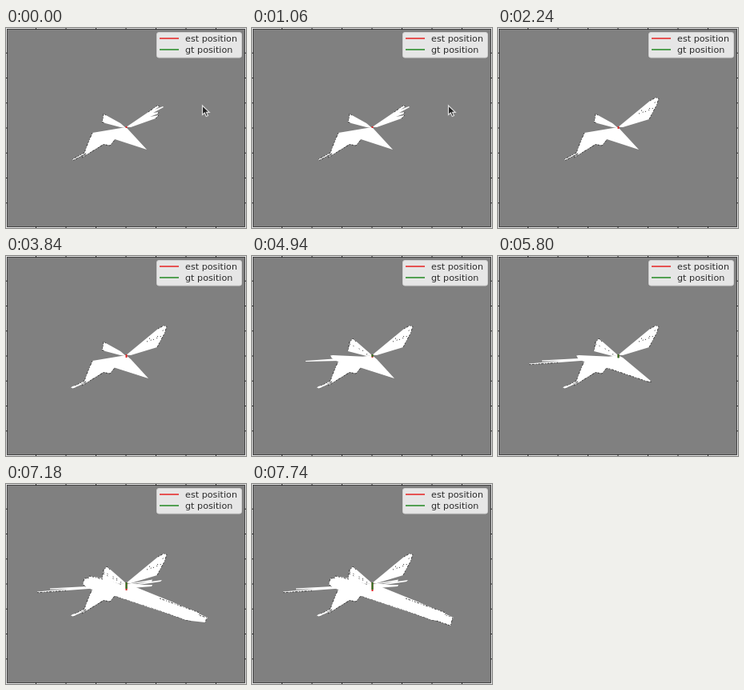
Write an HTML page that moves like this. It is 300 px wide and 250 px high and loops after 8000 ms.

```html
<!DOCTYPE html>
<html lang="en">
<head>
<meta charset="utf-8">
<title>Occupancy map</title>
<style>
  html, body { margin: 0; width: 100%; height: 100%; overflow: hidden; background: #808080; }
  svg { display: block; width: 300px; height: 250px; }
  .free { fill: #fff; }
  .wall { fill: none; stroke: #222; stroke-width: .8; stroke-dasharray: 2 1.5 3 2 1 2; }
  .spots { fill: none; stroke: #222; stroke-width: 1; stroke-dasharray: 1 4 1 7; }
  .gap { fill: #808080; }
  .trail { fill: none; stroke-width: 2; }
  text { font: 11.2px "DejaVu Sans", sans-serif; fill: #2a2a2a; }
</style>
</head>
<body>
<svg viewBox="0 0 300 250">
  <rect width="300" height="250" fill="#808080"/>
  <rect x=".5" y=".5" width="299" height="249" fill="none" stroke="#e4e4e4"/>
  <rect x="1.500" y="1.500" width="297" height="247" fill="none" stroke="#333" stroke-width=".8"/>
  <path id="ticks" fill="none" stroke="#222"/>

  <!-- lower left -->
  <path class="free" d="M150 124L108 131L102 145L98 156L83 164L84 165.500L101 156L95 162L122 145L130 147L136 139L176 152L152 126Z"/>
  <path class="wall" d="M108 131L102 145L98 156L83 164M84 165.500L100 157M95 162L122 145.500L130 147L136 140"/>
  <path class="free" data-from="2440" d="M83 163L81 164.500L84 165.500L100 158Z"/>

  <!-- upper left -->
  <path class="free" d="M150 125L143 119L125 109L122 107L121 115L119 117L124 119L143 124Z"/>
  <path class="wall" d="M125 109L122 107L121 115L119 117L124 119"/>
  <path class="free" data-from="4660" d="M150 124L126 103L122 108L120 119L143 125Z"/>
  <path class="wall" data-from="4660" d="M130 107L126 103L122 108L120 118"/>
  <path class="spots" data-from="4660" d="M122 110L144 121L143 125"/>
  <path class="free" data-from="4940" d="M145 126L101 124L98 124.500L100 128L109 133L130 133Z"/>
  <path class="free" data-from="4940" data-to="5520" d="M109 128L67 131V132L109 131Z"/>
  <path class="free" data-from="5520" d="M110 127.500L55 130.500V131.700L80 131L39 134.500V135.700L110 130.500Z"/>
  <path class="wall" data-from="5520" d="M39 135.700L75 133.300"/>
  <path class="free" data-from="6060" d="M145 126L122 118L104 115L103 118L98 118L96 125L100 129L112 131Z"/>
  <path class="wall" data-from="6060" d="M121 119L104 115L103 118L98 118L96 125L100 129"/>
  <path class="spots" data-from="6060" d="M122 112L131 117L143 122V126"/>

  <!-- upper right -->
  <g data-to="2000">
    <path class="free" d="M150 124L178 105L189 97L192 98L186 102L196 98L197 99L184 106L191 105L190 107L180 111L191 109L187 113L156 124Z"/>
    <path class="wall" d="M178 105L189 97L192 98M191 105L190 107M191 109L187 113"/>
  </g>
  <path class="free" data-from="1300" data-to="2000" d="M151 124L184 100L193 92L194 94L160 122Z"/>
  <g data-from="2000">
    <path class="free" d="M150 124L190 91L197 87L201 88L198 97L192 108L189 114L156 124Z"/>
    <path class="wall" d="M190 91L197 87L201 88L198 97L192 108L189 114"/>
    <path class="spots" d="M176 107L193 101L197 91M179 103L187 105L191 98"/>
  </g>

  <!-- lower right -->
  <path class="free" data-from="2740" d="M150 124L156 129L178 153L134 139Z"/>
  <path class="free" data-from="5220" d="M150 124L156 127L192 157L187 157L134 139Z"/>
  <path class="wall" data-from="5220" data-to="6060" d="M192 157L187 157L137 140"/>
  <path class="free" data-from="6060" d="M150 125L157 129L218 163L217 167L134 139Z"/>
  <g data-from="6340">
    <path class="free" d="M150 125L155 126L208 147.500L252 167L251 168.500L208 150L172 137L231 170.500L225 170L192 158L134 139Z"/>
    <path class="wall" d="M231 171L225 170L192 158L137 140"/>
  </g>
  <path class="free" data-from="6640" d="M190 141L239 160L237 171L225 170L190 157L165 136Z"/>
  <g data-from="7180">
    <path class="free" d="M150 125L190 142L242 161L241 164L251 167L249 173L231 171L192 158L134 139Z"/>
    <path class="wall" d="M192 143L242 161L241 164L251 167L249 173"/>
  </g>
  <path class="free" data-from="7460" d="M241 164L251 167L248 177L231 171Z"/>
  <path class="wall" data-from="7460" d="M251 167L248 177L231 171"/>
  <path class="free" data-from="6640" d="M151 125L183 119.500L182 122L156 127Z"/>
  <path class="free" data-from="7180" d="M153 126L195 120L193 122L166 126L183 126L182 128L157 130Z"/>
  <path class="gap" data-from="7180" d="M158 125L178 122L164 125Z"/>

  <path id="est" class="trail" stroke="#d92020"/>
  <path id="gt" class="trail" stroke="#207520"/>

  <rect x="188.500" y="5.500" width="106" height="31.500" rx="2.500" fill="#e6e6e6" stroke="#d0d0d0"/>
  <path d="M192 13H216" stroke="#e65353" stroke-width="2"/>
  <path d="M192 27H216" stroke="#53a053" stroke-width="2"/>
  <text x="224" y="16.500">est position</text>
  <text x="224" y="30.500">gt position</text>

  <path id="cursor" d="M0 0V11.500L2.800 9L4.800 13.500L7 12.500L5 8.300H8.700Z" fill="#222" stroke="#ddd" stroke-width="1.200"/>
</svg>
<script>
  const LOOP = 8000;
  const $ = id => document.getElementById(id);
  const layers = [...document.querySelectorAll('[data-from], [data-to]')].map(el => ({
    el, from: +(el.dataset.from || 0), to: +(el.dataset.to || LOOP)
  }));

  // time, end of the true trail, end of the estimated trail
  const trail = [
    [0, 123, 125], [2240, 123, 126], [3300, 123, 127], [4940, 126, 127],
    [5520, 127.5, 127], [6060, 128, 129], [6340, 128, 129.5],
    [6640, 129, 131], [7180, 131, 133], [7740, 132, 134]
  ];

  let d = '';
  for (let i = 1; i < 8; i++) {
    const x = i * 37.5, y = i * 31.25;
    d += `M${x} 0v2M${x} 250v-2M0 ${y}h2M300 ${y}h-2`;
  }
  $('ticks').setAttribute('d', d);

  function draw(t) {
    for (const { el, from, to } of layers) {
      el.style.display = t >= from && t < to ? '' : 'none';
    }
    const [, gt, est] = trail.findLast(step => t >= step[0]);
    $('est').setAttribute('d', `M150.5 123V${est}`);
    $('gt').setAttribute('d', `M150.5 123V${gt}`);
    $('cursor').style.display = t < 2060 ? '' : 'none';
    $('cursor').setAttribute('transform', t < 1860 ? 'translate(245.5 97)' : 'translate(268 100)');
  }

  function tick() {
    draw(performance.now() % LOOP);
    requestAnimationFrame(tick);
  }
  tick();
</script>
</body>
</html>
```
